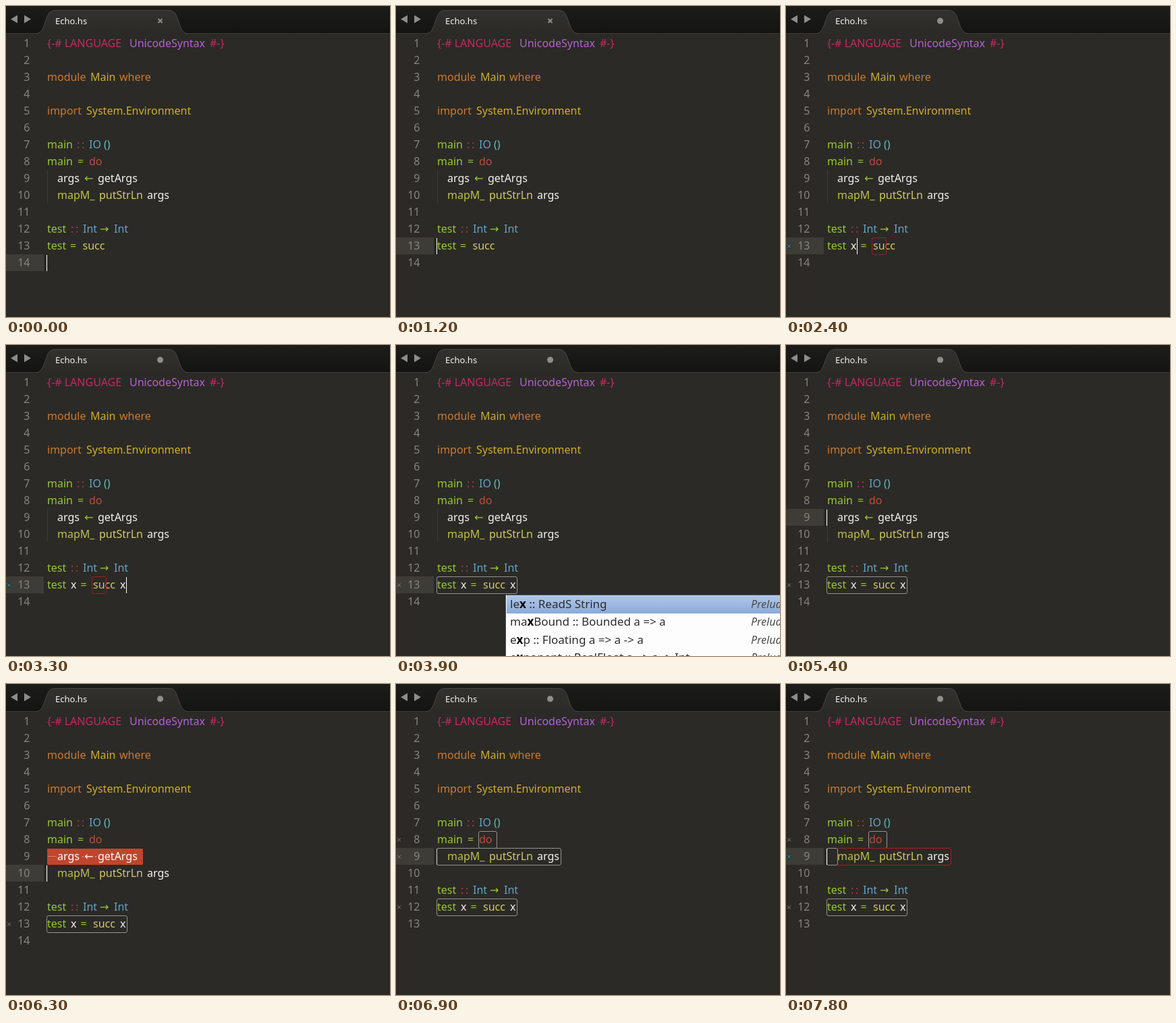
An HTML page with a canvas that plays this animation: 569x461 px, repeating every 8 s.

```html
<!DOCTYPE html>
<html lang="en">
<head>
<meta charset="utf-8">
<title>Editor</title>
<style>
html, body { margin: 0; width: 100%; height: 100%; overflow: hidden; background: #2b2a26; }
canvas { display: block; }
</style>
</head>
<body>
<canvas id="stage" width="569" height="461"></canvas>
<script>
const ctx = document.getElementById('stage').getContext('2d');
const LOOP = 8000, ROW = 25;
const SANS = '"Noto Sans", "Open Sans", sans-serif';
const CODE = '16px ' + SANS;
const ARROW = '16px "DejaVu Sans", sans-serif';
const C = {
  bg: '#2b2a26', row: '#3e3c37', num: '#85847c', white: '#f4f4ee',
  pink: '#c52a63', violet: '#b561d2', orange: '#cb7a32', gold: '#d0ae2c',
  green: '#98c932', op: '#b83a3f', blue: '#63a4c7', teal: '#64bfc0',
  red: '#bd4d38', olive: '#c0c148', sand: '#d2cb66',
  error: '#9c2022', warn: '#92918b', select: '#c1452e'
};

// Each token is [x, text, colour].
const head = [
  [[61, '{-# LANGUAGE', C.pink], [183, 'UnicodeSyntax', C.violet], [302, '#-}', C.pink]],
  [],
  [[61, 'module', C.orange], [125, 'Main', C.gold], [168, 'where', C.orange]],
  [],
  [[61, 'import', C.orange], [119, 'System.Environment', C.gold]],
  [],
  [[61, 'main', C.green], [105, ':', C.op], [112, ':', C.op], [123, 'IO', C.blue], [145, '()', C.teal]],
  [[61, 'main', C.green], [106, '=', C.green], [123, 'do', C.red]]
];
const argsLine = [[76, 'args', C.white], [116, '←', C.green], [136, 'getArgs', C.white]];
const mapLine = [[76, 'mapM_', C.olive], [138, 'putStrLn', C.sand], [209, 'args', C.white]];
const typeLine = [[61, 'test', C.green], [96, ':', C.op], [103, ':', C.op], [114, 'Int', C.blue],
  [139, '→', C.green], [160, 'Int', C.blue]];

// Caret steps: [time, line, x, opacity]
const caretSteps = [
  [0, 14, 60, 1], [300, 14, 60, .5], [600, 14, 60, 0], [1200, 13, 60, 1],
  [1500, 13, 91, 1], [2100, 13, 95, 1], [2400, 13, 105, 1], [2700, 13, 163, 1],
  [3000, 13, 168, 1], [3300, 13, 178, 1], [3600, 13, 178, .5], [3900, 13, 178, 0],
  [4200, 12, 165, 1], [4500, 10, 194, 1], [4800, 9, 189, 1], [5100, 9, 76, 1],
  [5400, 9, 60, 1], [5700, 9, 60, .5], [6000, 9, 60, 0], [6300, 10, 60, 1],
  [6600, 9, 60, 1], [6900, 9, 60, .5], [7200, 9, 60, 0], [7800, 9, 60, 1]
];

const between = (t, a, b) => t >= a && t < b;
const rowTop = line => 43 + (line - 1) * ROW;

function text(s, x, y, color, font = CODE, align = 'left') {
  ctx.font = font;
  ctx.fillStyle = color;
  ctx.textAlign = align;
  ctx.fillText(s, x, y);
  return ctx.measureText(s).width;
}

function rect(x, y, w, h, color) {
  ctx.fillStyle = color;
  ctx.fillRect(x, y, w, h);
}

function outline(line, x0, x1, color) {
  ctx.strokeStyle = color;
  ctx.lineWidth = 1;
  ctx.beginPath();
  ctx.roundRect(x0 + .5, rowTop(line) + .5, x1 - x0 - 1, ROW, 2.5);
  ctx.stroke();
}

function cross(x, y, r, color, width) {
  ctx.strokeStyle = color;
  ctx.lineWidth = width;
  ctx.beginPath();
  ctx.moveTo(x - r, y - r);
  ctx.lineTo(x + r, y + r);
  ctx.moveTo(x + r, y - r);
  ctx.lineTo(x - r, y + r);
  ctx.stroke();
}

function marker(line, isError) {
  const y = rowTop(line) + 13;
  if (isError) rect(1, y - 4, 7, 8, '#1d3b3d');
  cross(4.5, y, 2.5, isError ? '#68898a' : '#7d7c75', 1);
}

function triangle(x, dir) {
  ctx.fillStyle = '#8d8d89';
  ctx.beginPath();
  ctx.moveTo(x + 5 * dir, 19.5);
  ctx.lineTo(x - 5 * dir, 13.5);
  ctx.lineTo(x - 5 * dir, 25.5);
  ctx.fill();
}

function header(dirty) {
  const bar = ctx.createLinearGradient(0, 0, 0, 40);
  bar.addColorStop(0, '#1c1c1a');
  bar.addColorStop(1, '#141412');
  rect(0, 0, 569, 40, bar);
  rect(0, 39, 569, 1, '#0e0e0d');
  rect(0, 40, 569, 1, '#3b3a35');
  triangle(12, -1);
  triangle(32, 1);

  ctx.beginPath();
  ctx.moveTo(44, 41);
  ctx.bezierCurveTo(53, 40, 54, 34, 58, 24);
  ctx.bezierCurveTo(62, 12, 64, 6.5, 73, 6.5);
  ctx.lineTo(241, 6.5);
  ctx.bezierCurveTo(250, 6.5, 252, 12, 256, 24);
  ctx.bezierCurveTo(260, 34, 261, 40, 270, 41);
  const tab = ctx.createLinearGradient(0, 6, 0, 41);
  tab.addColorStop(0, '#32312d');
  tab.addColorStop(1, C.bg);
  ctx.fillStyle = tab;
  ctx.fill();
  ctx.strokeStyle = '#484740';
  ctx.lineWidth = 1;
  ctx.stroke();

  text('Echo.hs', 73, 27, '#f6f6f4', '13px ' + SANS);
  if (dirty) {
    ctx.fillStyle = '#8f8e89';
    ctx.beginPath();
    ctx.arc(228.5, 22, 4.5, 0, 7);
    ctx.fill();
  } else cross(228.5, 22, 3, '#8f8e89', 2);
}

function testLine(t) {
  const shift = t < 2100 ? 0 : t < 2400 ? 4.5 : 15.5;
  const line = [[61, 'test', C.green], [95 + shift, '=', C.green], [113.5 + shift, 'succ', C.sand]];
  if (t >= 2400) line.push([96, 'x', C.white]);
  if (t >= 3300) line.push([169, 'x', C.white]);
  return line;
}

function popup() {
  rect(162, 370, 407, 91, '#55544f');
  rect(163, 371, 406, 90, '#fdfdfd');
  const glow = ctx.createLinearGradient(0, 371, 0, 398);
  glow.addColorStop(0, '#b0c8ea');
  glow.addColorStop(1, '#8caad8');
  rect(164, 371, 405, 27, glow);
  const items = [['le', ' :: ReadS String'], ['ma', 'Bound :: Bounded a => a'],
    ['e', 'p :: Floating a => a -> a'], ['e', 'ponent :: RealFloat a => a -> Int']];
  items.forEach(([before, after], i) => {
    const y = 389.5 + i * 26.5, font = '17px ' + SANS;
    let x = 169;
    x += text(before, x, y, '#2c2c2c', font);
    x += text('x', x, y, '#000', 'bold ' + font);
    text(after, x, y, '#2c2c2c', font);
    text('Prelude', 526, y, '#4c4c4c', 'italic 16px ' + SANS);
  });
}

function selection() {
  ctx.fillStyle = C.select;
  ctx.beginPath();
  ctx.roundRect(61, rowTop(9) + 1, 142, 24, 2);
  ctx.fill();
  rect(62, rowTop(9) + 12, 13, 1, '#da8470');
  rect(113, rowTop(9) + 12, 2, 2, '#da8470');
  rect(132, rowTop(9) + 12, 2, 2, '#da8470');
}

function draw(t) {
  const removed = t >= 6600;
  const selected = between(t, 6300, 6600);
  const [, line, x, alpha] = caretSteps.findLast(s => s[0] <= t);
  const lines = [...head, ...(removed ? [] : [argsLine]), mapLine, [], typeLine, testLine(t), []];
  const last = lines.length - 1;

  rect(0, 0, 569, 461, C.bg);
  header(t >= 2100);
  rect(0, rowTop(line), 56, ROW, C.row);
  for (let y = rowTop(9); y < rowTop(removed ? 10 : 11); y += 2) rect(61, y, 1, 1, '#4b4a43');
  if (selected) selection();

  lines.forEach((tokens, i) => {
    const y = rowTop(i + 1) + 18;
    text(i + 1, 35.5, y, C.num, CODE, 'right');
    for (const [tx, s, color] of tokens) {
      const white = selected && i === 8;
      text(s, tx, y, white ? '#fff' : color, '←→'.includes(s) ? ARROW : CODE);
    }
  });

  if (between(t, 2400, 3600)) {
    outline(last, 127, 149, C.error);
    marker(last, true);
  }
  if (t >= 3600) {
    outline(last, 60, 180, C.warn);
    marker(last, false);
  }
  if (t >= 6900) {
    const failed = t >= 7800;
    outline(8, 122, 150, C.warn);
    if (failed) outline(9, 76, 245, C.error);
    outline(9, 60, failed ? 77 : 245, C.warn);
    marker(8, false);
    marker(9, failed);
  }

  ctx.globalAlpha = alpha;
  rect(x, rowTop(line) + 1, 1, ROW - 1, '#fff');
  ctx.globalAlpha = 1;
  if (between(t, 3600, 4200)) popup();
}

const start = performance.now();
function tick() {
  draw((performance.now() - start) % LOOP);
  requestAnimationFrame(tick);
}
tick();
</script>
</body>
</html>
```
